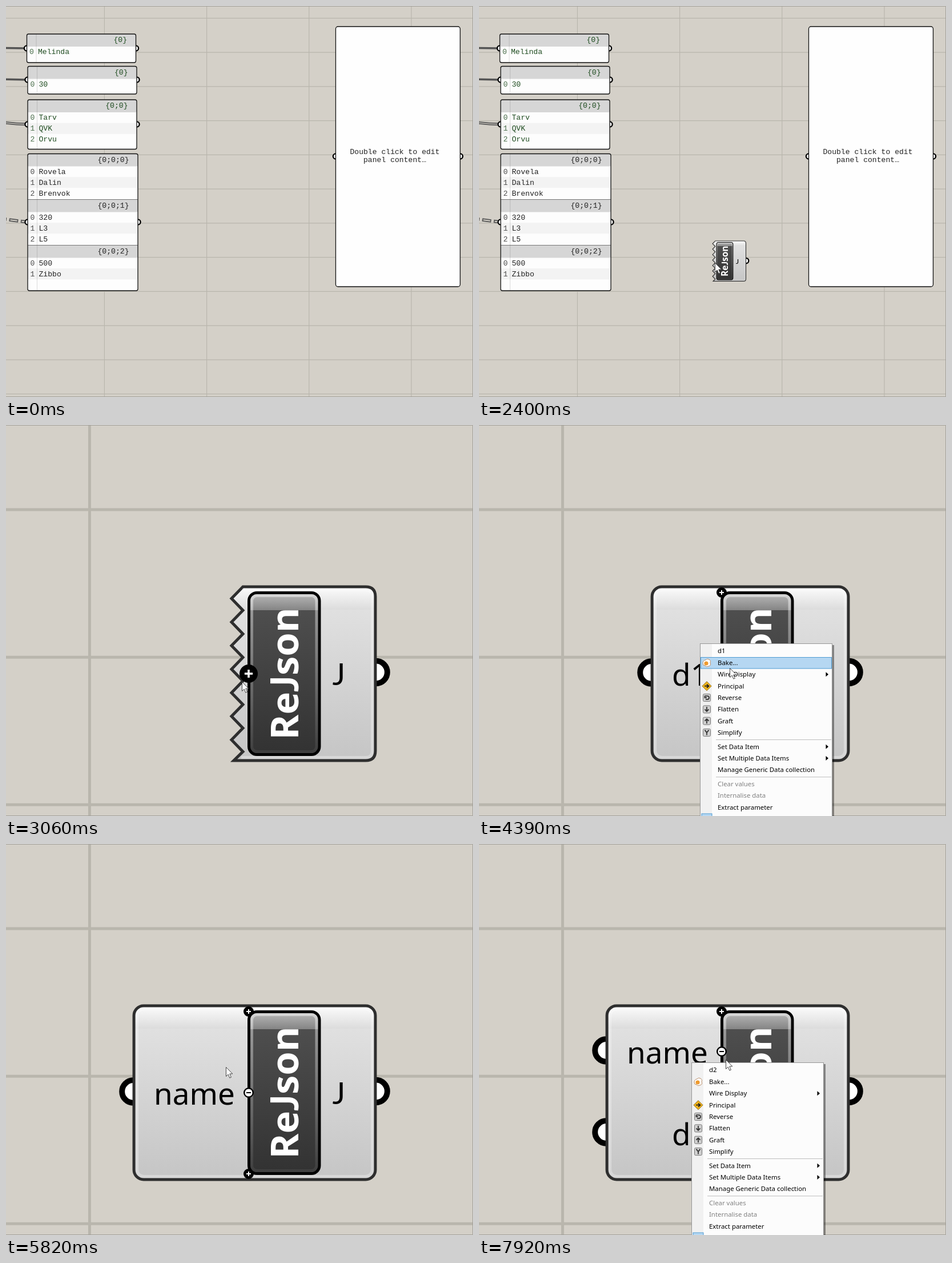
An HTML page for the animation above (8 s loop, 818 by 684 pixels).

```html
<!DOCTYPE html>
<html lang="en">
<head>
<meta charset="utf-8">
<title>Node editor</title>
<style>
html, body { margin: 0; width: 100%; height: 100%; overflow: hidden; background: #d4d0c8; }
svg { display: block; width: 818px; height: 684px; }
.mono { font: 13.1px "Liberation Mono", monospace; }
.label { font: 53px "Noto Sans", sans-serif; }
.title { font: bold 67px "Noto Sans", sans-serif; fill: #fff; }
.hook { font-family: Lato, sans-serif; }
.menu { font: 11.4px "Noto Sans", sans-serif; }
.find { font: 10.6px "Liberation Sans", sans-serif; }
</style>
</head>
<body>
<svg viewBox="0 0 818 684" xmlns="http://www.w3.org/2000/svg">
  <defs>
    <linearGradient id="body" x1="0" x2="0" y1="283" y2="587" gradientUnits="userSpaceOnUse">
      <stop offset="0" stop-color="#fcfcfc"/><stop offset=".132" stop-color="#dcdcdc"/>
      <stop offset=".132" stop-color="#e0e0e0"/><stop offset="1" stop-color="#c5c5c5"/>
    </linearGradient>
    <linearGradient id="button" x1="0" x2="0" y1="293" y2="577" gradientUnits="userSpaceOnUse">
      <stop offset="0" stop-color="#bcbcbc"/><stop offset=".108" stop-color="#858585"/>
      <stop offset=".108" stop-color="#4e4e4e"/><stop offset="1" stop-color="#323232"/>
    </linearGradient>
    <linearGradient id="rim" x1="0" x2="0" y1="0" y2="1">
      <stop offset="0" stop-color="#fff" stop-opacity=".45"/><stop offset="1" stop-color="#fff" stop-opacity=".06"/>
    </linearGradient>
  </defs>
  <g id="world"><g id="desk"></g><g id="node"></g></g>
  <path d="M0 .5H817.5V683.5H0" fill="none" stroke="#a3a19a"/>
  <g id="overlay"></g>
</svg>
<script>
const LOOP = 8000, ZOOM = 4.32, CX = 413.4, CY = 449.6;
const $ = id => document.getElementById(id);

// Screen updates come in bursts: first time, last time, number of updates.
const bursts = [
  [100, 870, 8], [1200, 1300, 2], [1730, 1970, 3], [2280, 2400, 2], [2620, 3400, 8],
  [3500, 3500, 1], [3720, 4490, 8], [4610, 4950, 4], [5260, 5600, 4], [5820, 5820, 1],
  [6030, 6810, 8], [6930, 7700, 8], [7800, 7920, 2]
];

// Pointer waypoints: time, x, y.
const route = [
  [100, 639, 608], [760, 441, 447], [2170, 441, 447], [2400, 413, 449], [3070, 413, 449],
  [3400, 425, 440], [3610, 425, 440], [3940, 317, 303], [4160, 388, 436], [4270, 388, 436],
  [4380, 439, 425], [4490, 441, 410], [4610, 445, 394], [4950, 385, 390], [5920, 385, 390],
  [6590, 425, 577], [6820, 425, 577], [7150, 234, 520], [7370, 373, 500], [7700, 490, 400],
  [7920, 432, 377]
];

function snap(t) {
  let s = 0;
  for (const [a, b, n] of bursts) {
    if (t < a) break;
    const step = n > 1 ? (b - a) / (n - 1) : 1;
    s = a + step * Math.min(n - 1, Math.floor((t - a) / step + .1));
  }
  return s;
}

function pointerAt(t) {
  const i = route.findIndex(p => p[0] >= t);
  if (i < 1) return route[i < 0 ? route.length - 1 : 0].slice(1);
  const [t0, x0, y0] = route[i - 1], [t1, x1, y1] = route[i];
  const k = (t - t0) / (t1 - t0);
  return [x0 + (x1 - x0) * k, y0 + (y1 - y0) * k];
}

const text = (x, y, s, cls, more = "") => `<text x="${x}" y="${y}" class="${cls}" ${more}>${s}</text>`;
const rect = (x, y, w, h, more) => `<rect x="${x}" y="${y}" width="${w}" height="${h}" ${more}/>`;
const path = (d, more) => `<path d="${d}" ${more}/>`;
const port = (x, y, k = 1) =>
  `<circle cx="${x}" cy="${y}" r="${4.6 * k}" fill="#fff" stroke="#000" stroke-width="${2.3 * k}"/>`;

// ---- desk: grid, wires and panels ----
function panel(x, y, w, h, portY, ink, blocks) {
  let s = port(x, portY) + port(x + w, portY) + rect(x, y, w, h, 'rx="3" fill="#fdfdfd"');
  let top = y;
  blocks.forEach(([branch, ...items], b) => {
    s += rect(x, top, w, 22, 'rx="2" fill="#d6d6d6"');
    if (b) s += path(`M${x} ${top}h${w}`, 'stroke="#777"');
    s += text(x + w - 15.5, top + 14, branch, "mono", `text-anchor="end" fill="${ink}"`);
    items.forEach((item, i) => {
      const mid = top + 31 + 19.2 * i;
      if (i % 2) s += rect(x, mid - 9.6, w, 19.2, 'fill="#f3f3f3"');
      s += text(x + 4.5, mid + 4, i, "mono", `fill="${ink}" opacity=".8"`);
      s += text(x + 19.5, mid + 4, item, "mono", `fill="${ink}"`);
    });
    top += 80;
  });
  return s + path(`M${x + 16.5} ${y}v${h}`, 'stroke="#000" stroke-opacity=".13"') +
    rect(x, y, w, h, 'rx="3" fill="none" stroke="#111" stroke-width="1.3"');
}

function desk() {
  let grid = "", s = "";
  for (let i = 0; i < 12; i++) grid += `M0 ${21.3 + 59.75 * i}H818`;
  for (let i = 0; i < 4; i++) grid += `M${172.4 + 179.2 * i} 0V684`;
  s += path(grid, 'stroke="#b9b6ad" stroke-width="1.15"');
  const wire = (d, more = "") => path(d, 'fill="none" stroke="#555" ' + more);
  s += wire("M0 73.5L36 74", 'stroke-width="3.4"') + wire("M0 128.2L36 129", 'stroke-width="3.4"');
  s += wire("M0 202.8Q18 205 36 205.3M0 205.8Q18 208 36 208.3", 'stroke-width="1.7"');
  const dashed = "M-14.5 371Q8 374.5 38 378", dash = 'stroke-dasharray="16 4.6"';
  s += wire(dashed, 'stroke-width="5.6" ' + dash);
  s += path(dashed, 'fill="none" stroke="#d4d0c8" stroke-width="2" stroke-dasharray="12.6 8" stroke-dashoffset="-1.7"');

  const green = "#1f4c20", dark = "#222";
  s += panel(36.5, 49, 191, 50, 74, green, [["{0}", "Melinda"]]);
  s += panel(38, 105.5, 191, 48.5, 129, green, [["{0}", "30"]]);
  s += panel(38, 164, 191, 86.5, 207, green, [["{0;0}", "Tarv", "QVK", "Orvu"]]);
  s += panel(38, 258.5, 193, 239.5, 378, dark, [
    ["{0;0;0}", "Rovela", "Dalin", "Brenvok"],
    ["{0;0;1}", "320", "L3", "L5"],
    ["{0;0;2}", "500", "Zibbo"]
  ]);
  s += port(577.5, 263) + port(795.5, 263);
  s += rect(577.5, 36, 218, 455, 'rx="4" fill="#fefefe" stroke="#111" stroke-width="1.3"');
  const mid = 'text-anchor="middle" fill="#222"';
  return s + text(681, 259, "Double click to edit", "mono", mid) + text(681, 273, "panel content…", "mono", mid);
}

// ---- component, drawn at full zoom ----
const pen = document.createElement("canvas").getContext("2d");
function widthOf(s) {
  pen.font = '53px "Noto Sans", sans-serif';
  return pen.measureText(s).width;
}

function knob(y, plus, [px, py], active) {
  const near = active && Math.hypot(px - 425, py - y) < 20;
  const k = near ? 16 / 9 : 1;
  const ink = plus ? "#fff" : "#000";
  return `<g transform="translate(425 ${y}) scale(${k})">
    <circle r="7.8" fill="${plus ? "#000" : "#fff"}" stroke="#000" stroke-width="2.4"/>
    ${path("M-4 0H4" + (plus ? "M0-4V4" : ""), `stroke="${ink}" stroke-width="2"`)}</g>`;
}

function node(inputs, pointer, knobs, active) {
  const n = inputs.length;
  const rowY = i => n === 1 ? 435 : 363 + 143 * i;
  let s = port(648, 432.5, ZOOM);
  if (n) {
    const left = 366 - Math.max(...inputs.map(widthOf));
    inputs.forEach((_, i) => s += port(left - 1, rowY(i) - 2, ZOOM));
    s += rect(left, 283, 647 - left, 304, 'rx="17" fill="url(#body)" stroke="#2e2e2e" stroke-width="5"');
    s += rect(left + 5.5, 288.5, 636 - left, 293, 'rx="12" fill="none" stroke="#fff" stroke-opacity=".3" stroke-width="5"');
    inputs.forEach((v, i) => s += text(401, rowY(i) + 20.5, v, "label", 'text-anchor="end"'));
  } else {
    let teeth = "M415 283";
    for (let i = 1; i < 15; i++) teeth += `L${i % 2 ? 395 : 415} ${283 + 20.6 * i}`;
    s += path(teeth + "L399 587H630Q647 587 647 570V300Q647 283 630 283Z",
      'fill="url(#body)" stroke="#2e2e2e" stroke-width="5"');
    s += path("M414 288.5H630Q641.5 288.5 641.5 300V570Q641.5 581.5 630 581.5H412",
      'fill="none" stroke="#fff" stroke-opacity=".3" stroke-width="5"');
  }
  s += rect(425.5, 293.5, 123.5, 283, 'rx="14" fill="url(#button)" stroke="#000" stroke-width="5"');
  s += rect(430.5, 298.5, 113.5, 273, 'rx="9" fill="none" stroke="url(#rim)" stroke-width="5"');
  s += text(0, 0, 'Re<tspan class="hook">J</tspan>son', "title", 'text-anchor="middle" transform="translate(512 435) rotate(-90)"');
  s += text(583, 455, "J", "label hook", 'style="font-family:Lato,sans-serif" text-anchor="middle"');
  if (knobs) {
    if (!n) s += knob(435, true, pointer, active);
    for (let i = 0; n && i <= n; i++) s += knob(293 + 284 * i / n, true, pointer, active);
    for (let i = 0; i < n; i++) s += knob(rowY(i), false, pointer, active);
  }
  return s;
}

// ---- context menu ----
const grey = g => rect(-6.5, -6.5, 13, 13, 'rx="2" fill="#cfcfcf" stroke="#777"') +
  path(g, 'fill="none" stroke="#333" stroke-width="1.8"');
const icons = {
  "Bake...": path("M-7 1Q-7-4-2-5Q0-8 4-6Q8-4 6 0Q8 5 3 6Q-1 8-3 5Q-7 5-7 1Z", 'fill="#fff" stroke="#b98e6a"') +
    '<circle cx="-1" cy="1" r="3.6" fill="#ee9a2e"/>',
  "Principal": path("M0-8L8 0L0 8L-8 0Z", 'fill="#f2b51d" stroke="#8a6510"') +
    path("M-4 0H3M0-3L3.5 0L0 3", 'fill="none" stroke="#222" stroke-width="1.8"'),
  "Reverse": grey("M-3-3H1A3 3 0 0 1 1 3H-2M-3.5-3.5V1M-4 0H0"),
  "Flatten": grey("M0-4.5V3M-3.5 0L0 3.5L3.5 0"),
  "Graft": grey("M0 4.5V-3M-3.5 0L0-3.5L3.5 0"),
  "Simplify": grey("M-3.5-4.5L0 0L3.5-4.5M0 0V4.5")
};
const entries = ["Bake...", "Wire Display", "Principal", "Reverse", "Flatten", "Graft", "Simplify", "-",
  "Set Data Item", "Set Multiple Data Items", "Manage Generic Data collection", "-",
  "Clear values", "Internalise data", "Extract parameter"];

function menu(x, name, selected, [px, py]) {
  let s = rect(x + 3, 385, 231, 320, 'fill="#000" opacity=".4"');
  s += rect(x - .5, 382.5, 231, 320, 'fill="#fcfcfc" stroke="#979797"');
  s += rect(x, 383, 20, 310, 'fill="#f1f1f1"');
  if (selected) s += rect(x + 29.5, 387, widthOf(name) * 11.4 / 53 + 1, 16, 'fill="#0078d7"');
  s += text(x + 30, 399, name, "menu", `fill="${selected ? "#fff" : "#000"}"`);
  let y = 416;
  for (const e of entries) {
    if (e === "-") {
      s += path(`M${x + 27} ${y - 8 + .1}H${x + 229}`, 'stroke="#bdbdbd"');
      y += 4.2;
      continue;
    }
    const off = e === "Clear values" || e === "Internalise data";
    if (!off && px > x && px < x + 230 && Math.abs(py - y) < 10)
      s += rect(x + .5, y - 9.5, 229, 19.5, 'fill="#b5d7f2" stroke="#4f9bd3"');
    if (icons[e]) s += `<g transform="translate(${x + 11} ${y})">${icons[e]}</g>`;
    if (/^(Wire|Set)/.test(e)) s += path(`M${x + 219.5} ${y - 4}l4.5 4l-4.5 4z`, "");
    s += text(x + 30, y + 4, e, "menu", `fill="${off ? "#808080" : "#000"}"`);
    y += 20.35;
  }
  return s + rect(x + 2, 680, 18, 18, 'fill="#b5d7f2" stroke="#4f9bd3"');
}

// ---- search box ----
const hits = ["Rectangle", "Relay", "Remap Numbers", "Repeat Data", "Replace Items",
  "Reverse List", "Reparameterize", "Receiver", "Rebuild Curve", "ReJson"];

function search(t) {
  const typed = t < 1200 ? "" : t < 1300 ? "r" : t < 1730 ? "re" : t < 1840 ? "rej" : "rejson";
  const rows = typed.length > 2 ? hits.slice(-1) : hits;
  let s = "";
  if (!typed) {
    s += rect(339.5, 406, 203, 30.5, 'fill="#efefef" stroke="#444"');
    s += text(441, 424.5, "Enter a search keyword...", "find", 'font-style="italic" text-anchor="middle"');
  } else rows.forEach((hit, i) => {
    const y = 436.5 - 31.7 * (rows.length - i);
    s += rect(339.5, y, 203, 31.7, 'fill="#efefef" stroke="#777"');
    s += rect(346, y + 8, 16, 16, 'rx="2" fill="#a9a9a9"');
    s += text(370, y + 20, hit, "find");
  });
  s += rect(339.5, 436.5, 203, 19.5, 'fill="#fff" stroke="#777"');
  return s + text(441, 450, typed, "find", 'text-anchor="middle"');
}

const arrow = (x, y) => `<g transform="translate(${x} ${y})">` +
  path("M.5 .5V16.5L4.2 13L6.8 19.2L9.4 18.1L6.8 12H11.8Z", 'fill="#fff" stroke="#333" stroke-width=".9"') + "</g>";
const beam = (x, y) => `<g transform="translate(${x} ${y})">` +
  path("M-4-7.5H4M0-7.5V7.5M-4 7.5H4", 'stroke="#111" stroke-width="2"') + "</g>";

function render(t) {
  const p = pointerAt(t);
  const zoom = Math.max(0, Math.min(1, (t - 2508.6) / 557.1));
  const k = ZOOM ** zoom;
  $("world").setAttribute("transform", `translate(${CX} ${CY}) scale(${k}) translate(${-CX} ${-CY})`);

  const typed = "name".slice(0, Math.max(0, Math.round((t - 5260) / 113.3) + 1));
  const name = t < 5260 ? "d1" : typed;
  const inputs = t < 3500 ? [] : t < 6690 ? [name] : [name, "d2"];
  const menuX = t >= 4270 && t < 5820 ? 388 : t >= 7370 ? 373 : 0;
  $("node").innerHTML = t >= 1970 ? node(inputs, p, zoom > .7, !menuX) : "";

  let s = "";
  if (t >= 870 && t < 1970) s += search(t);
  if (menuX) s += menu(menuX, menuX === 388 ? name : "d2", t >= 4720 && t < 5260, p);
  if (t >= 870 && t < 1970) s += beam(443, 447.5);
  else if (t >= 4600 && t < 4900) s += beam(...p);
  else if (t >= 100) s += arrow(...p);
  $("overlay").innerHTML = s;
}

$("desk").innerHTML = desk();
$("node").setAttribute("transform", `translate(${CX} ${CY}) scale(${1 / ZOOM}) translate(${-CX} ${-CY})`);

const start = performance.now();
let shown = -1;
function tick() {
  const t = snap((performance.now() - start) % LOOP);
  if (t !== shown) render(shown = t);
  requestAnimationFrame(tick);
}
tick();
</script>
</body>
</html>
```
